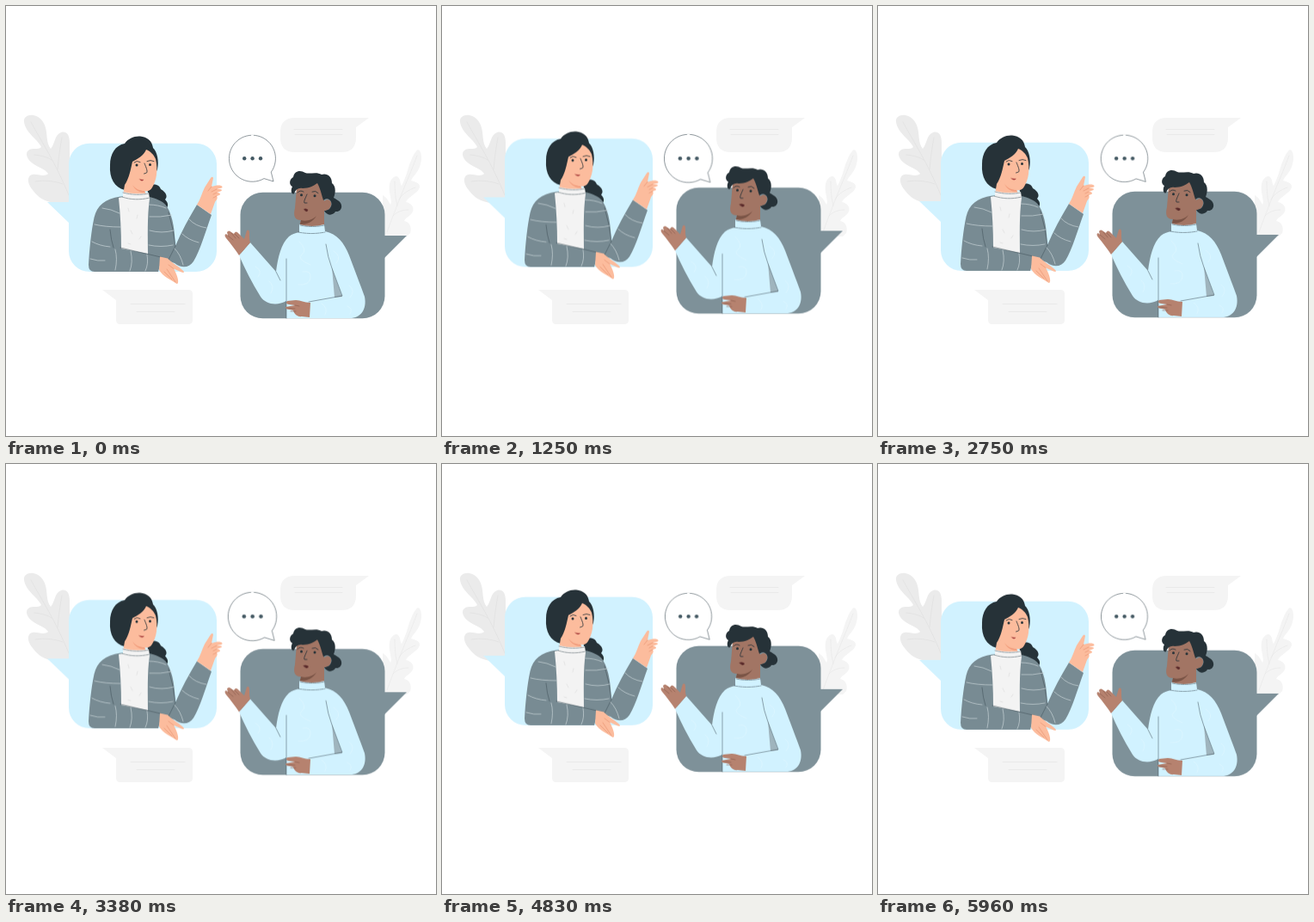
Animation of 500 by 500 pixels, one loop 6000 ms. Source, as an HTML page without scripts:

```html
<!DOCTYPE html>
<html lang="en">
<head>
<meta charset="utf-8">
<title>Conversation</title>
<style>
  html, body { margin: 0; width: 100%; height: 100%; overflow: hidden; background: #fff; }
  svg { display: block; width: 100vw; height: 100vh; }
  .float { animation: float 3s linear infinite; }
  .pulse { transform-origin: 286.5px 177.2px; animation: pulse 1s ease infinite; }
  .mouth { transform-box: fill-box; transform-origin: center; animation: talk 3s linear infinite; }
  @keyframes float { 50% { transform: translateY(-6.7px); } }
  @keyframes pulse { 50% { transform: scale(1.045); } }
  @keyframes talk { 0%, 100% { transform: scaleX(.8); } 10%, 90% { transform: none; } }
  .line { fill: none; stroke-linecap: round; stroke-linejoin: round; }
  .grey { fill: #f4f4f4; }
  .rule { stroke: #e6e6e6; stroke-width: .7; }
  .dark { fill: #263238; }
  .ink { stroke: #263238; stroke-width: .8; }
  .slate { fill: #7e9199; }
  .coat { fill: #788b93; }
  .sky { fill: #d1f2ff; }
  .peach { fill: #fcbc9d; }
  .peach-line { stroke: #e58f6e; stroke-width: .6; }
  .brown { fill: #a27564; }
  .hand { fill: #b6826f; }
  .hand-line { stroke: #8a5d4d; stroke-width: .6; }
  .thread { stroke: #d0dade; stroke-width: .65; }
  .fold { stroke: #3c4d55; stroke-width: .5; }
  .knit { stroke: #def6ff; stroke-width: .8; }
</style>
</head>
<body>
<svg viewBox="0 0 500 500">
  <!-- leaves -->
  <path fill="#ebebeb" d="M21 135C20 129 26 126 32 127C41 129 46 137 47 147C48 155 48 161 52 166C57 161 56 150 64 147C71 145 74 151 74 159V229H56C43 227 36 221 31 214C26 208 24 201 28 197C34 193 43 200 49 195C45 189 38 188 31 183C24 178 22 171 26 168C31 164 37 168 41 164C38 156 23 148 21 135Z"/>
  <path class="line" stroke="#dedede" stroke-width=".6" d="M29 135C42 159 57 181 73 220M33 173C42 174 49 176 53 179M65 153C63 164 61 177 60 190M34 204C46 202 58 204 66 207"/>
  <path class="grey" d="M479 167C484 169 484 179 481 187C478 195 473 198 471 203C475 204 482 206 481 211C479 218 468 221 465 228C471 229 475 234 473 239C470 245 464 246 463 250C470 251 472 258 470 264L466 268H438V220C442 222 445 227 447 231C450 227 444 216 446 207C447 201 453 196 456 199C459 202 458 207 460 209C465 200 467 190 470 182C473 174 476 169 479 167Z"/>
  <path class="line" stroke="#e6e6e6" stroke-width=".6" d="M478 174C469 198 457 224 443 263M452 204C452 216 453 224 455 232M476 211C468 214 461 218 457 225M468 237C461 237 455 239 450 244"/>

  <!-- side notes -->
  <path class="grey" d="M336 130H422L407 141V153Q407 170 390 170H336Q319 170 319 153V147Q319 130 336 130Z"/>
  <path class="line rule" d="M335 143.5H391M336 149.5H391"/>
  <path class="grey" d="M112 330H212Q217 330 217 335V365Q217 370 212 370H133Q128 370 128 365V342Z"/>
  <path class="line rule" d="M145 346.5H208M152 355.5H196"/>

  <g class="float">
    <!-- left panel -->
    <path class="sky" d="M97 159.7H221A24 24 0 0 1 245 183.7V285A24 24 0 0 1 221 309H97A24 24 0 0 1 73 285V252L48 228H73V183.7A24 24 0 0 1 97 159.7Z"/>

    <!-- woman -->
    <path class="dark" d="M138 214C126 211 120 200 121 185C121 172 127 162 138 160C142 154 149 151 156 151.5C164 152 170 157 171 165C176 170 178 180 176 190L165 213Z"/>
    <path class="dark" d="M164 210C170 206 178 207 180 213C187 217 188 222 185 225C190 230 189 236 182 236.5C180 230 172 230 166 224Z"/>
    <path class="peach" d="M147 181C153 178 160 174 163 167C168 169 172 173 174 178C177 191 175 203 170 211C168 215 164 216 161 215L164 220H136L138 208C143 201 145 190 147 181Z"/>
    <path fill="#f29e7e" d="M147 208C151 213 156 215 161 215L162 217C155 217 150 214 147 208Z"/>
    <circle class="dark" cx="152" cy="185" r="1.5"/>
    <circle class="dark" cx="167.5" cy="184.5" r="1.5"/>
    <path class="line ink" d="M149 182Q152 179 156 181.5M164 180.5Q168 178.500 172 180.500M161 183C163 188 165 192 163.500 194L160.500 195"/>
    <path class="mouth" fill="#a83f3c" d="M154 200.500Q157 202.500 161 201.500Q158 206 154 200.500Z"/>

    <path class="coat" d="M133 221.500C115 224 106 232 102.500 246C99 262 97 283 96 301Q96 309 103 309H177L181 294L196 299C205 306 213 304 218 297C226 284 232 262 239 243L222 231C213 246 204 262 197 279C196 263 195 246 187 233C182 226 174 224 167 222Z"/>
    <path fill="#f3f3f3" d="M136 216Q151 220 166 217L167 224C164 245 165 270 165 288L134 282C134 262 133 242 131 223L136 222Z"/>
    <path class="line fold" d="M135 222Q150 227 167 223M136 217Q151 221 166 218" stroke-dasharray="3 1"/>
    <path class="line" stroke="#dedede" stroke-width=".7" d="M142 235L143 239M153 243L152 247M145 261L147 265M157 268L155 271M142 276L145 277"/>
    <path class="line fold" d="M133 281L180 292M121 260Q122 272 125 281M197 279L187 299M189 240Q195 260 197 279"/>
    <path class="line thread" d="M112 235Q122 236 132 241M103 254Q115 257 133 257M100 274Q109 279 121 280M98 294Q107 297 115 296M127 283Q130 294 127 307M145 285Q148 298 144 308M164 289Q166 300 162 308M166 231Q177 231 186 235M167 245Q179 246 193 243M167 261Q181 265 195 261M166 278Q180 281 194 278M196 282Q203 289 206 301M205 265Q212 272 224 275M213 248Q220 256 233 258"/>
    <path class="peach" d="M222 231C226 225 228 217 231 211L238 200Q240 197.500 241 200L239 210C243 209 247 208 250 209Q252.500 210 251 211.500L245 213C249 213 252 213 250.500 215L245 217C249 217 250 219 248 220L245 221C247 224 244 226 243 228L238 242Z"/>
    <path class="line peach-line" d="M239 210L235 215M245 213L239 216M245 217L241 219M245 221L241 223"/>
    <path class="peach" d="M179 291.500L188 293.500C193 299 203 304 207 309Q207 310.500 204 309.500L195 305.500C198 311 201 318 200 322Q199 324 197 322C191 318 183 315 178 307Z"/>
    <path class="line peach-line" d="M189 301L195 305.500M187 306L197 321M184 309L193 318"/>

    <!-- right panel -->
    <path class="slate" d="M440 267H466L440 293Z"/>
    <rect class="slate" x="272.500" y="216.800" width="168" height="146.500" rx="26"/>

    <!-- man -->
    <path class="brown" d="M338 211C344 206 354 204 363 204C367 211 369 220 370 227C374 223 379 226 378 231C377 236 374 238 370 238V257H341L343 249C335 249 334 243 336 235Z"/>
    <path class="dark" d="M335 218C337 213 340 211 345 212C352 212 358 209 362 206C365 211 367 219 369 226C373 222 379 225 378.500 231C377.500 236 374 238 370 238C374 245 381 243 383 239C389 240 392 234 389 229C387 226 384 225 381 223C384 215 383 209 379 206C379 198 373 194 367 196C361 192 353 196 348 194C342 190 335 192 334 199C329 202 329 208 333 210C330 216 333 220 335 218Z"/>
    <path fill="#7a5446" d="M343 249C350 251 357 248 361 244C357 251 350 254 342 254Z"/>
    <circle class="dark" cx="343.500" cy="219.800" r="1.500"/>
    <circle class="dark" cx="359" cy="220.800" r="1.500"/>
    <path class="line ink" d="M339 217Q342 213.500 346 216M356 216Q360 214 363 217.500M350 219C348 224 346 227 347 229L350 229"/>
    <path class="mouth" fill="#5b2b2b" d="M345.500 236Q349 234.500 352 237Q349.500 242 345.500 236Z"/>

    <path class="sky" d="M341 254Q356 258 370 254L371 262C385 265 393 275 399 290C405 306 412 324 417 338C420 353 412 363 400 363H326V343C315 349 302 347 296 338C286 322 278 306 271 290L284 275L314 309C316 293 320 276 329 268C333 265 337 264 341 263Z"/>
    <path fill="#9fb4bd" d="M379 304C382 315 387 326 391 338L382 339Z"/>
    <path class="line fold" d="M340 263Q355 266 371 263M342 255Q356 258 370 255" stroke-dasharray="4 1"/>
    <path class="line fold" d="M372 277Q374 292 379 305L391 337L352 344M326 294V363M314 309L319 319"/>
    <path class="line knit" d="M341 274Q351 284 344 289T354 301M345 309Q355 307 354 316T340 324M381 285Q391 291 384 299M290 303Q299 308 293 315M306 320Q313 326 308 334M399 325Q407 331 400 339M367 346Q375 351 371 359M397 349Q404 352 400 358"/>
    <path class="hand" d="M271 290C267 284 262 277 256 270Q253 266 256 265L258 267L257 263Q259 260 262 263L265 265Q267 260 271 265L277 271L280 261Q283 259 283 264C283 269 283 273 284 275Z"/>
    <path class="line hand-line" d="M258 267L264 272M262 264L267 270M266 265L271 270"/>
    <path class="hand" d="M354 345C346 345 343 342 337 342L327 343Q324 346 329 347L336 348L325 350Q325 353 330 353L334 354C335 358 339 362 344 361L353 362Z"/>
    <path class="line hand-line" d="M336 348L341 349M327 351L336 352M331 355L337 355"/>
  </g>

  <!-- typing bubble -->
  <g class="pulse">
    <path d="M300 200.600L311 204L308.300 193.100A27 27 0 1 0 300 200.600Z" fill="#fff" stroke="#37474f" stroke-width=".55" stroke-linejoin="round"/>
    <path d="M285 150.200H288" stroke="#fff" stroke-width="1.400"/>
    <g fill="#455a64">
      <circle cx="277.200" cy="177.300" r="2.200"/>
      <circle cx="286.600" cy="177.300" r="2.200"/>
      <circle cx="296" cy="177.300" r="2.200"/>
    </g>
  </g>
</svg>
</body>
</html>
```
